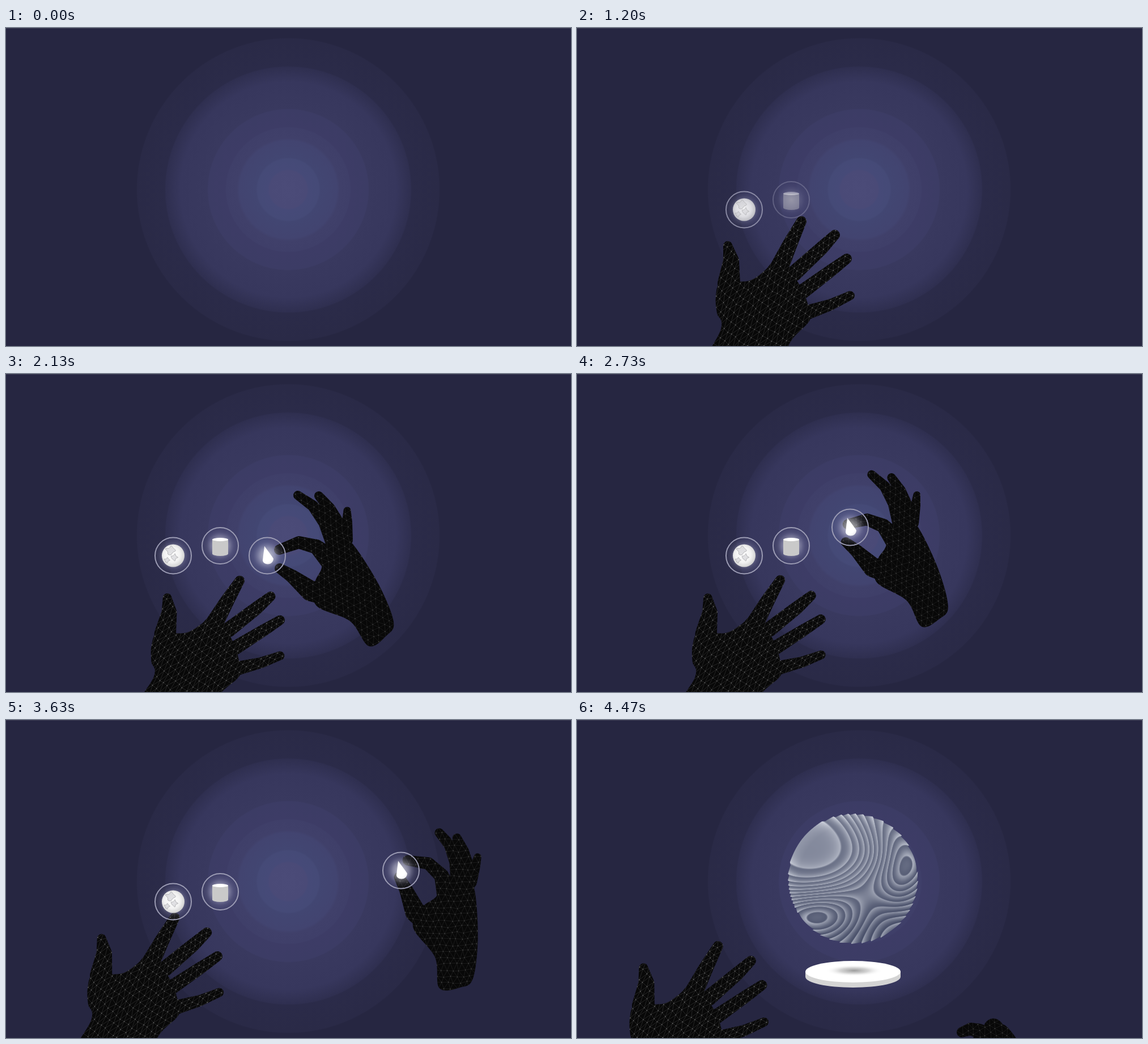
Recreate the animation shown at these times as an HTML page with a canvas. Size 997x561 px, loop 4.5 s.

```html
<!DOCTYPE html>
<html lang="en">
<head>
<meta charset="utf-8">
<title>Hands and shapes</title>
<style>
html, body { margin: 0; width: 100%; height: 100%; overflow: hidden; background: #262641; }
canvas { display: block; }
</style>
</head>
<body>
<canvas id="stage" width="997" height="561"></canvas>
<script>
const W = 997, H = 561, LOOP = 4500, STEP = 30, TAU = 2 * Math.PI;
const ctx = document.getElementById('stage').getContext('2d');
const clamp = x => Math.min(1, Math.max(0, x));
const fade = (t, from, to) => clamp((t - from) / (to - from));
const smooth = (t, from, to) => { const u = fade(t, from, to); return u * u * (3 - 2 * u); };

// Monotone Hermite interpolation of keys [time, ...values].
function track(keys, t) {
  const last = keys.length - 1;
  if (t <= keys[0][0]) return keys[0].slice(1);
  if (t >= keys[last][0]) return keys[last].slice(1);
  const k = keys.findIndex(key => key[0] > t) - 1;
  const span = keys[k + 1][0] - keys[k][0], u = (t - keys[k][0]) / span;
  const slope = (n, i) => n < 0 || n >= last ? 0 :
    (keys[n + 1][i] - keys[n][i]) / (keys[n + 1][0] - keys[n][0]);
  const tangent = (n, i) => {
    const a = slope(n - 1, i), b = slope(n, i);
    return a * b <= 0 ? 0 : 2 * a * b / (a + b);
  };
  const ease = u * u * (3 - 2 * u);
  return keys[k].slice(1).map((v, n) => v + (keys[k + 1][n + 1] - v) * ease +
    span * u * (1 - u) * (tangent(k, n + 1) * (1 - u) - tangent(k + 1, n + 1) * u));
}

// Closed Catmull-Rom curve through points.
function outline(points) {
  const path = new Path2D(), n = points.length, P = i => points[(i + n) % n];
  path.moveTo(...P(0));
  for (let i = 0; i < n; i++) {
    const [a, b, c, d] = [P(i - 1), P(i), P(i + 1), P(i + 2)];
    path.bezierCurveTo(
      b[0] + (c[0] - a[0]) / 6, b[1] + (c[1] - a[1]) / 6,
      c[0] - (d[0] - b[0]) / 6, c[1] - (d[1] - b[1]) / 6, ...c);
  }
  path.closePath();
  return path;
}

// Tapered limb: the hull of each pair of neighbouring discs [x, y, radius].
function addLimb(path, joints) {
  for (let i = 1; i < joints.length; i++) {
    const [x, y, r] = joints[i - 1], [X, Y, R] = joints[i];
    const dir = Math.atan2(Y - y, X - x);
    const open = Math.acos(Math.max(-1, Math.min(1, (r - R) / Math.hypot(X - x, Y - y))));
    const hull = new Path2D();
    hull.arc(x, y, r, dir + open, dir - open + TAU);
    hull.arc(X, Y, R, dir - open, dir + open);
    hull.closePath();
    path.addPath(hull);
  }
}

// Turn and scale joints around a pivot; radii stay.
function bend(joints, px, py, deg, k) {
  const c = Math.cos(deg * TAU / 360) * k, s = Math.sin(deg * TAU / 360) * k;
  return joints.map(([x, y, r]) =>
    [px + (x - px) * c - (y - py) * s, py + (x - px) * s + (y - py) * c, r]);
}

// Left hand, measured from the tip of its index finger.
const leftPath = outline([
  [-153, 140], [-143, 116], [-95, 113], [-67, 95], [-48, 76], [-30, 90], [-5, 120], [9, 153],
  [13, 182], [-22, 222], [-50, 290], [-180, 290], [-144, 198], [-151, 170]]);
[
  [[-132, 51, 8], [-126, 78, 14], [-130, 118, 20]],
  [[-2, 8, 9], [-22, 48, 13], [-45, 98, 17]],
  [[57, 32, 9], [33, 56, 12], [-15, 100, 14]],
  [[78, 74, 9], [50, 95, 11], [0, 132, 13]],
  [[84, 139, 8], [50, 155, 10], [5, 170, 13]]
].forEach(limb => addLimb(leftPath, limb));

// Right hand, measured from the fork of index and middle finger.
const rightPalm = outline([
  [-5, 45], [0, 5], [28, -8], [50, 3], [95, 73], [122, 140], [109, 165], [78, 183],
  [45, 139], [-14, 112], [-17, 72]]);
const thumb = [[-79, 46, 9], [-57, 60, 12], [-24, 86, 18], [0, 90, 20]];
const index = [[-80, 13, 9], [-45, 0, 11], [-14, 8, 13], [14, 34, 20]];
const others = [
  [[-47, -83, 8], [-20, -64, 10], [2, -36, 13], [20, 0, 18]],
  [[-10, -82, 8], [9, -60, 10], [22, -28, 16]],
  [[40, -56, 6.5], [40, -36, 9], [35, -5, 15]]];

// Keys: time, x, y, degrees, scale.
const leftKeys = [
  [345, 391, 566, 0, 1], [870, 391, 331, 0, 1], [1200, 398, 333, 0, 1],
  [1740, 418, 352, 5, 0.96], [2130, 415, 357, 5, 0.96], [2490, 415, 357, 5, 0.96],
  [2730, 361, 356, 4.5, 0.96], [3060, 297, 342, 3, 0.97], [3630, 300, 341, 2.5, 0.98],
  [4110, 300, 342, 2.5, 0.98], [4470, 251, 391, 2, 1]];
const rightKeys = [
  [1260, 610, 700, 12, 1.04], [1560, 685, 370, 18, 1.04], [1740, 626, 264, 12, 1.04],
  [2040, 567, 287, 1, 1], [2130, 562, 297, 0, 1], [2430, 562, 294, 0, 1],
  [2730, 555, 262, 7, 0.96], [2880, 605, 228, 15, 0.97], [3090, 775, 252, 28, 1],
  [3630, 785, 275, 29, 1], [4110, 788, 285, 29, 1], [4470, 715, 545, 0, 1]];
const dropKeys = [
  [2430, 461, 320.5], [2730, 482, 270.5], [2880, 527, 238], [3090, 687, 242], [3630, 697, 265.5]];

function rightPath(t) {
  const open = 1 - smooth(t, 1740, 2040), fist = smooth(t, 4110, 4470);
  const curl = open + smooth(t, 2730, 3090);
  const path = new Path2D(rightPalm);
  addLimb(path, bend(thumb, -24, 86, -12 * open, 1 + 0.06 * open));
  addLimb(path, bend(index, 0, 0, 0, 1 - 0.55 * fist));
  for (const limb of others) {
    addLimb(path, bend(limb, 20, 0, -14 * curl, (1 - 0.12 * curl) * (1 - 0.9 * fist)));
  }
  return path;
}

// Jittered triangle net growing from a point along a direction.
function mesh(ox, oy, angle, rows, cols, gap, along, jitter) {
  let seed = 7;
  const rnd = () => (seed = seed * 16807 % 2147483647) / 2147483647 - 0.5;
  const ca = Math.cos(angle), sa = Math.sin(angle), lines = new Path2D(), dots = new Path2D();
  const grid = Array.from({ length: rows }, (_, i) => Array.from({ length: cols }, (_, j) => {
    const b = (j - cols / 2 + i % 2 / 2) * gap + rnd() * jitter;
    const a = along(i) + b * b * 0.0008 + rnd() * jitter;
    return [ox + a * ca - b * sa, oy + a * sa + b * ca];
  }));
  grid.forEach((line, i) => line.forEach((p, j) => {
    dots.rect(p[0] - 0.6, p[1] - 0.6, 1.2, 1.2);
    const next = grid[i + 1] || [];
    for (const q of [line[j + 1], next[j], next[j + (i % 2 ? 1 : -1)]]) {
      if (q) { lines.moveTo(...p); lines.lineTo(...q); }
    }
  }));
  return { lines, dots };
}
const leftMesh = mesh(-108, 262, -0.96, 34, 40, 9, i => 17 * i - 0.17 * i * i, 4);
const rightMesh = mesh(108, 183, -2.11, 34, 32, 11, i => 11 * i - 20, 4);

function hand(keys, t, path, net, alpha) {
  const [x, y, deg, k] = track(keys, t);
  ctx.save();
  ctx.translate(x, y);
  ctx.rotate(deg * TAU / 360);
  ctx.scale(k, k);
  ctx.fillStyle = '#080808';
  ctx.fill(path);
  ctx.clip(path);
  ctx.strokeStyle = `rgba(215,215,215,${alpha})`;
  ctx.lineWidth = 0.5;
  ctx.stroke(net.lines);
  ctx.fillStyle = `rgba(225,225,225,${alpha * 1.5})`;
  ctx.fill(net.dots);
  ctx.restore();
}

function radial(x, y, r, stops) {
  const g = ctx.createRadialGradient(x, y, 0, x, y, r);
  stops.forEach(([at, color]) => g.addColorStop(at / r, color));
  return g;
}
function ellipse(x, y, rx, ry, fill) {
  ctx.beginPath();
  ctx.ellipse(x, y, rx, ry, 0, 0, TAU);
  ctx.fillStyle = fill;
  ctx.fill();
}

const backdrop = radial(498, 285, 268, [
  [0, '#4b4b78'], [33, '#4a4a77'], [36, '#464a78'], [54, '#454a77'], [57, '#424672'],
  [86, '#424470'], [91, '#40406a'], [109, '#3f3f69'], [111, '#3d3c66'], [141, '#3c3c65'],
  [143, '#39395f'], [190, '#37375d'], [216, '#2f2f50'], [218, '#2b2b49'],
  [266, '#2a2a47'], [268, '#262641']]);

function background() {
  ctx.fillStyle = backdrop;
  ctx.fillRect(0, 0, W, H);
  ctx.fillStyle = 'rgba(255,255,255,.1)';
  ctx.fillRect(0, 0, W, 1);
}

const blob = (x, y, r) => outline(Array.from({ length: 9 }, (_, i) => {
  const a = i * TAU / 9, k = r * (1 + 0.35 * Math.sin(2.6 * i + x));
  return [x + k * Math.cos(a), y + k * Math.sin(a)];
}));
const lands = [blob(-5, -9, 7), blob(2, 3, 5), blob(-11, 8, 4)];

function globe() {
  ellipse(0, 0, 20, 20, radial(-2, -2, 23, [[0, '#fff'], [14, '#f2f2f2'], [23, '#d0d0d0']]));
  ctx.strokeStyle = '#a8a8aa';
  ctx.fillStyle = 'rgba(200,200,205,.5)';
  ctx.lineWidth = 0.8;
  lands.forEach(p => { ctx.fill(p); ctx.stroke(p); });
}
function cylinder() {
  const body = new Path2D();
  body.ellipse(0, 14, 14, 4, 0, 0, Math.PI);
  body.lineTo(-14, -11);
  body.lineTo(14, -11);
  ctx.fillStyle = '#c9c9c9';
  ctx.fill(body);
  ellipse(0, -11, 14, 3, '#fff');
}
function drop() {
  ctx.beginPath();
  ctx.moveTo(-5, -17);
  ctx.lineTo(11, 5);
  ctx.bezierCurveTo(11, 12, 5, 15, 1, 15);
  ctx.bezierCurveTo(-4, 15, -8, 12, -8, 8);
  ctx.closePath();
  ctx.fillStyle = radial(-2, 1, 18, [[0, '#fff'], [10, '#fff'], [18, '#e2e2e6']]);
  ctx.fill();
}

function bubble(x, y, alpha, icon) {
  if (alpha <= 0) return;
  ctx.save();
  ctx.globalAlpha = alpha;
  ctx.translate(x, y);
  ellipse(0, 0, 32, 32, radial(0, 0, 32, [
    [0, 'rgba(255,255,255,.75)'], [14, 'rgba(225,225,240,.44)'],
    [24, 'rgba(170,170,205,.16)'], [32, 'rgba(140,140,180,.04)']]));
  ctx.strokeStyle = '#9c9cb4';
  ctx.lineWidth = 2;
  ctx.stroke();
  icon();
  ctx.restore();
}

// Rippled ball, shaded along the contours of a smooth height field.
function makeBall(r) {
  const size = 2 * r + 4, c = document.createElement('canvas');
  c.width = c.height = size;
  const g = c.getContext('2d'), img = g.createImageData(size, size);
  const dist = (u, v, x, y, sx, sy) => ((u - x) / sx) ** 2 + ((v - y) / sy) ** 2;
  const hill = (...a) => Math.exp(-dist(...a));
  const plateau = (...a) => Math.exp(-(dist(...a) ** 2));
  for (let y = 0; y < size; y++) for (let x = 0; x < size; x++) {
    const u = (x - r - 1.5) / r, v = (y - r - 1.5) / r, d = Math.hypot(u, v);
    if (d > 1.02) continue;
    const w = u + 0.05 * Math.sin(5 * v);
    const h = hill(w, v, 0.77, -0.16, 0.36, 0.6) + hill(u, v, -0.54, 0.58, 0.6, 0.35)
      - 1.4 * plateau(w, v, -0.7, -0.55, 0.95, 0.8) - 1.1 * hill(u, v, 0.85, 0.95, 0.7, 0.6);
    const f = ((h * 5 + 0.45) % 1 + 1) % 1;
    const ridge = f < 0.88 ? f / 0.88 : (1 - f) / 0.12;
    const light = clamp(0.14 + 0.42 * ridge ** 1.6 - 0.14 * v - 0.06 * u
      + 0.1 * (1 - d) + 0.2 * clamp(d * 6 - 5) * ridge);
    const i = 4 * (y * size + x);
    img.data[i] = 70 + 150 * light;
    img.data[i + 1] = 77 + 147 * light;
    img.data[i + 2] = 103 + 130 * light;
    img.data[i + 3] = 255 * clamp((1 - 0.02 * (1 - ridge) - d) * r + 0.5);
  }
  g.putImageData(img, 0, 0);
  return c;
}
const ball = makeBall(115);

function pedestal() {
  ellipse(487, 453, 84, 19, '#d4d4d4');
  ctx.fillRect(403, 444, 168, 9);
  ellipse(487, 444, 84, 19, '#fff');
  ctx.save();
  ctx.translate(489, 442);
  ctx.scale(1, 0.2);
  ellipse(0, 0, 50, 50, radial(0, 0, 50, [
    [0, 'rgba(120,120,120,.75)'], [25, 'rgba(160,160,160,.45)'], [50, 'rgba(255,255,255,0)']]));
  ctx.restore();
}

function draw(t) {
  background();
  const show = fade(t, 3690, 4050), stay = 1 - fade(t, 3660, 3900);
  if (show > 0) {
    ctx.globalAlpha = show;
    pedestal();
    ctx.drawImage(ball, 370, 163);
    ctx.globalAlpha = 1;
  }
  hand(leftKeys, t, leftPath, leftMesh, 0.28);
  hand(rightKeys, t, rightPath(t), rightMesh, 0.16);
  bubble(295, 320.5, fade(t, 900, 1260) * stay, globe);
  bubble(378, 303, fade(t, 1070, 1400) * stay, cylinder);
  bubble(...track(dropKeys, t), fade(t, 1240, 1570) * stay, drop);
}

const start = performance.now();
function tick() {
  const t = (performance.now() - start) % LOOP;
  draw(Math.floor(t / STEP) * STEP);
  requestAnimationFrame(tick);
}
tick();
</script>
</body>
</html>
```
